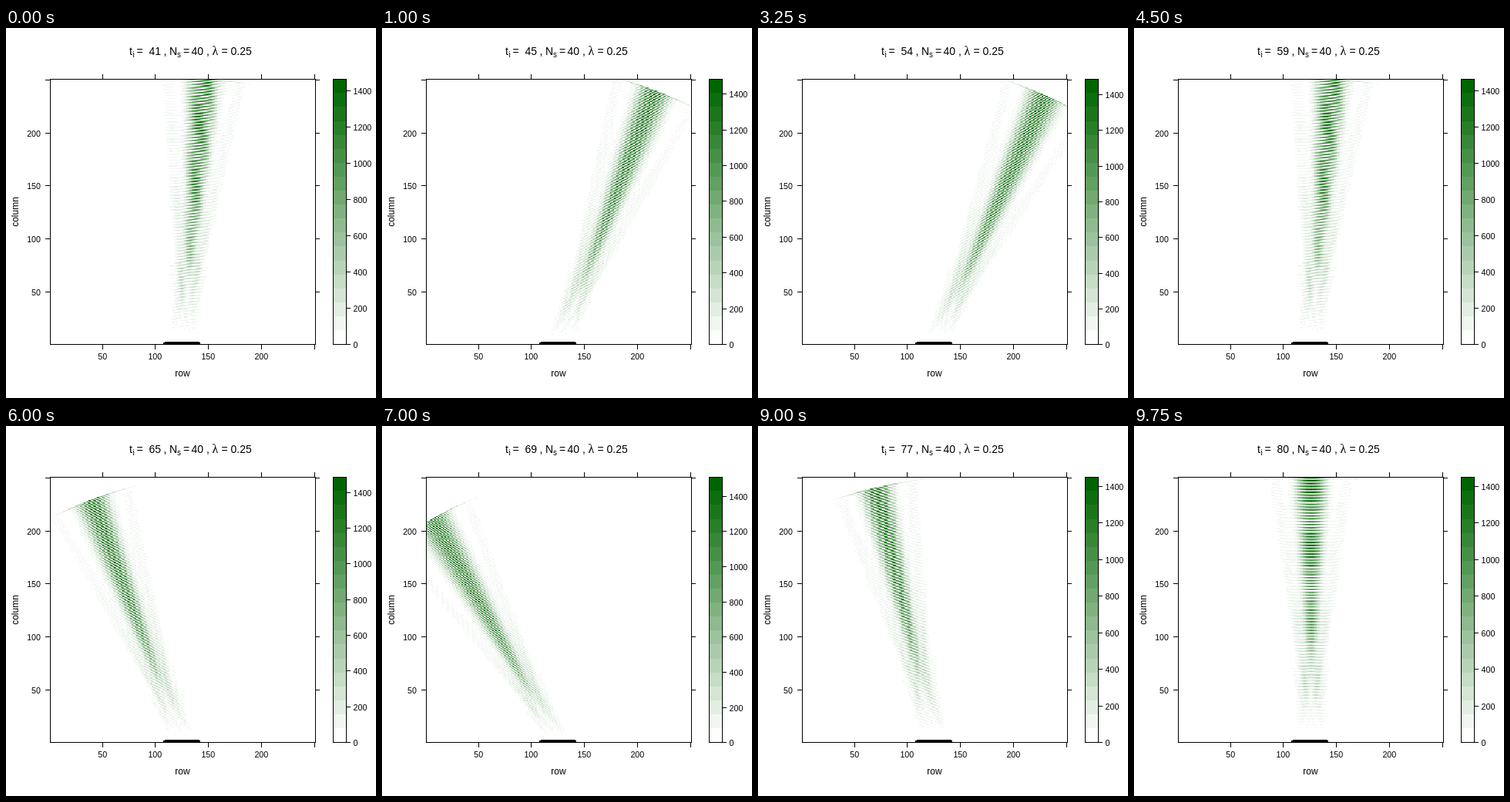
These frames come from a looping animation (480 px wide and 480 px high, 10 s). An HTML page with a canvas:

```html
<!DOCTYPE html>
<html lang="en">
<head>
<meta charset="utf-8">
<title>Phased array beam</title>
<style>
  html, body { margin: 0; width: 100%; height: 100%; overflow: hidden; background: #fff; }
  canvas, svg { position: absolute; left: 0; top: 0; }
  text { font-family: "Liberation Sans", Arial, sans-serif; font-size: 10.7px; fill: #000; }
  .axis { font-size: 12px; }
  .title { font-size: 14px; }
  .sub { font-size: 10px; }
  .greek { font-family: "Liberation Serif", "Times New Roman", serif; font-size: 16px; }
  path, .frame { fill: none; stroke: #000; stroke-width: 1; shape-rendering: crispEdges; }
</style>
</head>
<body>
<canvas id="field" width="480" height="480"></canvas>
<svg id="chart" width="480" height="480" viewBox="0 0 480 480"></svg>
<script>
const STEP = 250, STEPS = 40, FIRST = 41;
const CELLS = 250, SOURCES = 40, BANDS = 19;
const WAVE = 3.125, PITCH = WAVE / 4, K = 2 * Math.PI / WAVE;   // in cells
const REACH = 250;
const LEFT = 57, TOP = 66, SIDE = 344, CELL = SIDE / CELLS;
const BAR = { x: 424, w: 17 };

// Plot coordinates, cut to whole pixels
const X0 = 57.05, Y0 = 410.7;
const pixX = off => Math.floor(X0 + off);
const pixY = off => Math.floor(Y0 - off);

const ctx = document.getElementById('field').getContext('2d');
const chart = document.getElementById('chart');

function add(tag, attrs, text, parent = chart) {
  const el = document.createElementNS('http://www.w3.org/2000/svg', tag);
  for (const key in attrs) el.setAttribute(key, attrs[key]);
  if (text !== undefined) el.textContent = text;
  parent.appendChild(el);
  return el;
}
const label = (x, y, text, attrs = {}, parent) => add('text', { x, y, ...attrs }, text, parent);
const middle = { 'text-anchor': 'middle' };

// Static parts of the chart
add('rect', { x: 206, y: 407, width: 45, height: 1 });
add('rect', { x: 204, y: 408, width: 48, height: 2 });
add('rect', { class: 'frame', x: LEFT + .5, y: TOP + .5, width: SIDE, height: SIDE });
add('rect', { class: 'frame', x: BAR.x + .5, y: TOP + .5, width: BAR.w, height: SIDE });

for (let v = 50; v <= CELLS; v += 50) {
  const off = (v - .5) * CELL, x = pixX(off), y = pixY(off);
  add('path', { d: `M${x + .5} 60V66M${x + .5} 411V417M51 ${y + .5}H57M402 ${y + .5}H407` });
  if (v < CELLS) {
    label(x + .3, 430, v, middle);
    label(45, y + 5, v, { 'text-anchor': 'end' });
  }
}
label(229, 452, 'row', { class: 'axis', ...middle });
label(0, 0, 'column', { class: 'axis', transform: 'translate(16 238.5) rotate(-90)', ...middle });

const title = (x, text, cls = 'title', y = 35) => label(x, y, text, { class: cls });
title(160, 't');
title(164.5, 'i', 'sub', 38);
title(169.5, '=');
const counter = title(185.5, '');
title(204.5, ',');
title(212, 'N');
title(222, 's', 'sub', 38);
title(230, '=');
title(240.5, '40');
title(260, ',');
title(267.5, 'λ', 'greek');
title(279.5, '=');
title(291.5, '0.25');

const scale = add('g', {});

// White to dark green
const shade = k => {
  const f = k / (BANDS - 1);
  return [255 * (1 - f), 255 - 155 * f, 255 * (1 - f)].map(Math.round);
};
const palette = Array.from({ length: BANDS }, (_, k) => shade(k));
const band = f => Math.min(BANDS - 1, Math.floor(f * BANDS));

// Distance and phase from every cell to every source, sources counted from the right
const total = CELLS * CELLS * SOURCES;
const dist = new Float32Array(total), cosR = new Float32Array(total), sinR = new Float32Array(total);
for (let y = 0, n = 0; y < CELLS; y++) {
  for (let x = 0; x < CELLS; x++) {
    for (let j = 1; j <= SOURCES; j++, n++) {
      const dx = x - 125 - (21 - j) * PITCH;
      const r = Math.sqrt(dx * dx + y * y);
      dist[n] = r;
      cosR[n] = Math.cos(K * r);
      sinR[n] = Math.sin(K * r);
    }
  }
}

// Squared sum of the shifted waves that have already arrived
function intensity(steer) {
  const limit = [], c = [], s = [];
  for (let j = 0; j < SOURCES; j++) {
    limit[j] = REACH + (j + 1) * PITCH * steer;
    c[j] = Math.cos(K * limit[j]);
    s[j] = Math.sin(K * limit[j]);
  }
  const power = new Float32Array(CELLS * CELLS);
  let max = 0;
  for (let p = 0, n = 0; p < power.length; p++) {
    let sum = 0;
    for (let j = 0; j < SOURCES; j++, n++) {
      if (dist[n] < limit[j]) sum += s[j] * cosR[n] - c[j] * sinR[n];
    }
    power[p] = sum * sum;
    if (power[p] > max) max = power[p];
  }
  return { power, max };
}

function render(ti) {
  const { power, max } = intensity(.5 * Math.sin(2 * Math.PI * ti / STEPS));
  const size = SIDE - 1, img = ctx.createImageData(size, size);
  for (let py = 0, q = 0; py < size; py++) {
    const row = Math.floor((Y0 - 1 - (TOP + 1 + py)) / CELL) * CELLS;
    for (let px = 0; px < size; px++, q += 4) {
      const col = Math.floor((LEFT + 2 + px - X0) / CELL);
      const rgb = palette[band(power[row + col] / max)];
      img.data[q] = rgb[0];
      img.data[q + 1] = rgb[1];
      img.data[q + 2] = rgb[2];
      img.data[q + 3] = 255;
    }
  }
  return { img, max };
}

function drawBar() {
  for (let k = 0; k < BANDS; k++) {
    const y0 = pixY((k + 1) * SIDE / BANDS), y1 = pixY(k * SIDE / BANDS);
    ctx.fillStyle = `rgb(${palette[k]})`;
    ctx.fillRect(BAR.x, y0, BAR.w, y1 - y0);
  }
}

function drawScale(max) {
  scale.textContent = '';
  for (let v = 0; v <= max; v += 200) {
    const y = pixY(v / max * SIDE);
    add('path', { d: `M442 ${y + .5}H447` }, undefined, scale);
    label(450.5, y + 5, v, {}, scale);
  }
}

const cache = [];
let shown = -1;

function show(step) {
  if (step === shown) return;
  shown = step;
  const pic = cache[step] || (cache[step] = render(FIRST + step));
  ctx.putImageData(pic.img, LEFT + 1, TOP + 1);
  drawScale(pic.max);
  counter.textContent = FIRST + step;
}

drawBar();
show(0);
const start = performance.now();
function tick() {
  const t = Math.max(0, performance.now() - start);
  show(Math.floor(t / STEP) % STEPS);
  requestAnimationFrame(tick);
}
requestAnimationFrame(tick);
</script>
</body>
</html>
```
